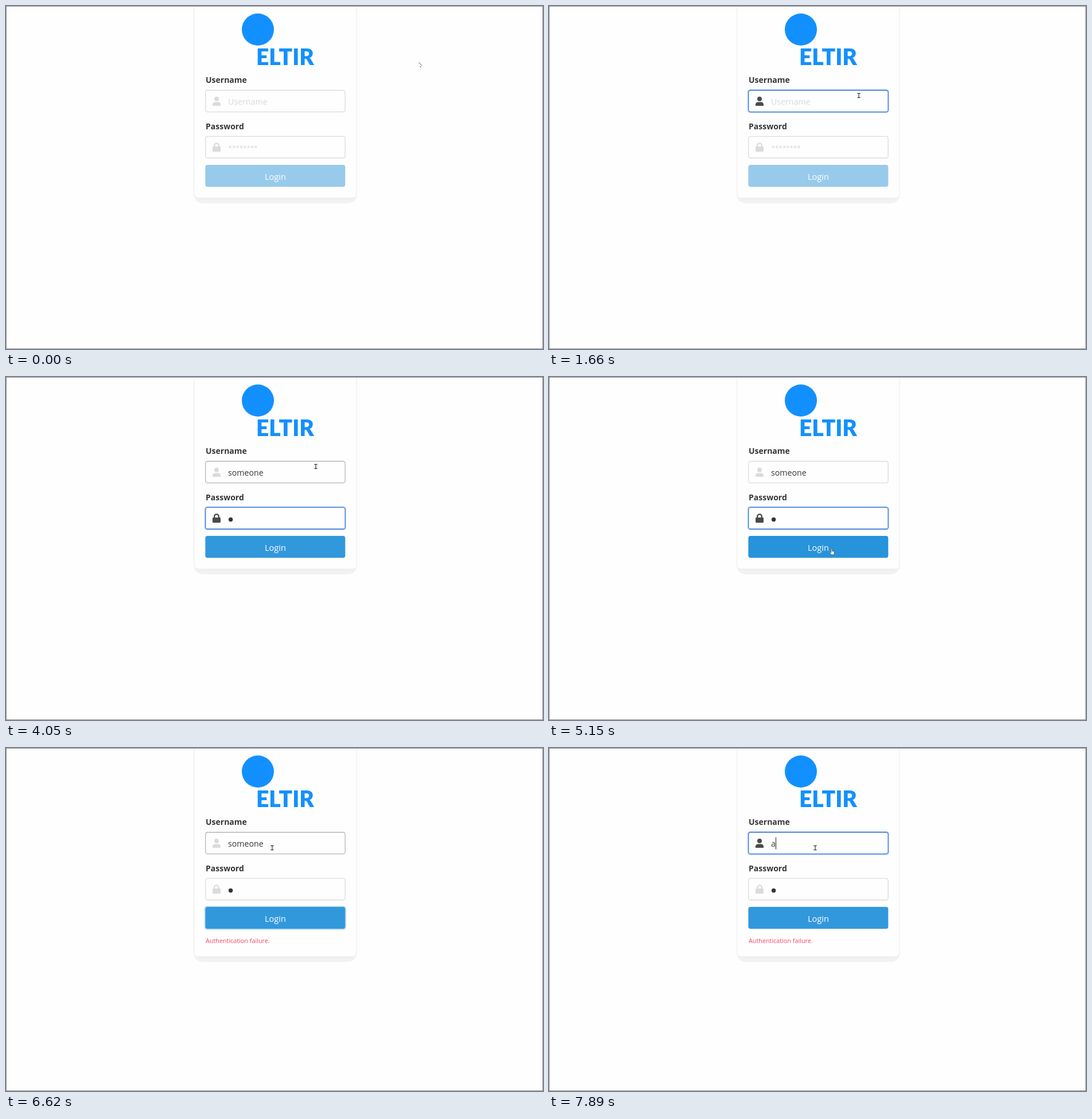
Animation, 936 px wide and 598 px high, one loop 8000 ms. Source, as an HTML page:

```html
<!DOCTYPE html>
<html lang="en">
<head>
<meta charset="utf-8">
<title>Login form</title>
<style>
  html, body { margin: 0; width: 100%; height: 100%; overflow: hidden; background: #fefefe; }
  svg { display: block; width: 936px; height: 598px; }
  text { font: 14.2px "Open Sans", "Noto Sans", sans-serif; fill: #363636; }
  .label { font-size: 14px; font-weight: 700; }
  .hint { fill: #d8d8d8; }
  .stars { font-size: 11.6px; }
  .login { font-size: 14.6px; fill: #fff; text-anchor: middle; }
  .error { font-size: 10.8px; fill: #f14668; }
  .brand { font: 900 39px Lato, "Open Sans", sans-serif; fill: #1390ff; text-anchor: end; }
</style>
</head>
<body>
<svg viewBox="0 0 936 598">
  <rect width="936" height="598" fill="#fefefe"/>
  <g id="card">
    <rect x="327.3" y="-60" width="284.2" height="404" rx="15" fill="#f2f2f2"/>
    <rect x="332" y="-60" width="275" height="398" rx="8" fill="#efefef"/>
    <rect x="327.3" y="-60" width="284.2" height="395.2" rx="7" fill="#f0f0f0"/>
    <rect x="328.5" y="-60" width="281.8" height="394" rx="6" fill="#fefefe"/>
  </g>
  <circle cx="439" cy="41" r="28" fill="#1390ff"/>
  <text class="brand" x="537" y="103">ELTIR</text>

  <text class="label" x="348" y="134">Username</text>
  <g id="userBox">
    <rect class="ring" x="345.4" y="144.7" width="247.8" height="42.2" rx="5.5" fill="#ccdcf6"/>
    <rect class="edge" x="347.7" y="147" width="243.4" height="37.6" rx="3.5" fill="#fefefe" stroke-width="1.3"/>
    <g class="icon">
      <circle cx="367" cy="162" r="4"/>
      <path d="M360 174v-2.2a4.2 4.2 0 0 1 4.2-4.2h5.6a4.2 4.2 0 0 1 4.2 4.2v2.2z"/>
    </g>
  </g>
  <rect id="selection" x="387" y="155" height="22" fill="#0078d7"/>
  <text id="userHint" class="hint" x="387" y="172.3">Username</text>
  <text id="userText" x="387" y="172.3"></text>

  <text class="label" x="348" y="214.5">Password</text>
  <g id="passBox">
    <rect class="ring" x="345.4" y="225.1" width="247.8" height="42.2" rx="5.5" fill="#ccdcf6"/>
    <rect class="edge" x="347.7" y="227.4" width="243.4" height="37.6" rx="3.5" fill="#fefefe" stroke-width="1.3"/>
    <g class="icon">
      <rect x="360" y="245" width="14" height="9" rx="1.4"/>
      <path d="M362 246v-2.8a5 5 0 0 1 10 0v2.8h-2.4v-2.8a2.6 2.6 0 0 0-5.2 0v2.8z"/>
    </g>
  </g>
  <text id="passHint" class="hint stars" x="387.5" y="251.2">********</text>
  <circle id="bullet" cx="391.6" cy="248.5" r="3.7" fill="#363636"/>
  <rect id="caret" width="1" height="21" fill="#222"/>

  <rect id="loginRing" x="345.4" y="274.9" width="247.8" height="42.4" rx="5.5" fill="#cbe5f6"/>
  <rect id="button" x="347.4" y="276.9" width="243.9" height="38.4" rx="4"/>
  <text id="loginText" class="login" x="469.5" y="302.8">Login</text>
  <path id="spinner" d="M463.6 290.6a7 7 0 1 0 11.4 8" fill="none" stroke="#fff" stroke-width="1.9"/>
  <text id="error" class="error" x="348" y="340.3">Authentication failure.</text>

  <g id="pointer" fill="none" stroke-linecap="round">
    <g id="arrow">
      <path d="M-2.5-3.5L3 1.8" stroke="#555"/>
      <path d="M0 3.2L1 4.2" stroke="#777" stroke-width="1.4"/>
      <path d="M-2.5-3.5V3.6" stroke="#eee" stroke-width=".6"/>
    </g>
    <path id="beam" d="M-2.2-3.6H2.2M0-3.6V3.6M-2.2 3.6H2.2" stroke="#333" stroke-width="1.2"/>
    <path id="hand" d="M-1.3 1.2V-5.1q.8-1.3 1.6 0V-1.5l3.2.8q1 .4.8 1.6L3.6 4.8H-.7L-3.5 1.3q.5-1.5 2.2-.1z"
      fill="#fff" stroke="#555" stroke-width=".8" stroke-linejoin="round"/>
  </g>
  <rect x=".5" y=".5" width="935" height="597" fill="none" stroke="#8c8c8c"/>
</svg>
<script>
const LOOP = 8000;
const NAME = "someone";
const $ = id => document.getElementById(id);
const show = (id, on) => $(id).setAttribute("display", on ? "inline" : "none");
const set = (el, name, value) => el.setAttribute(name, value);
const at = (kind, x, y, hover = "") => ({ kind, x, y, hover });
const type = n => ({ text: NAME.slice(0, n), caret: true });

const START = {
  text: "", focus: "", caret: false, selected: false,
  filled: false, busy: false, failed: false, ...at("arrow", 722, 102)
};

// Each step changes part of the state from its time on.
const STEPS = [
  [120, at("arrow", 681, 118)],
  [300, at("arrow", 632, 128)],
  [425, at("arrow", 588, 140)],
  [550, at("beam", 554, 152, "user")],
  [700, at("beam", 540, 156, "user")],
  [1130, { focus: "user", caret: true }],
  [1660, { caret: false }],
  [2090, { caret: true }],
  [2400, type(2)],
  [2680, type(3)],
  [2830, type(4)],
  [2950, type(5)],
  [3230, type(6)],
  [3370, type(7)],
  [3620, { focus: "pass", caret: true }],
  [4050, { filled: true, caret: false }],
  [4610, { caret: true, ...at("beam", 537, 163, "user") }],
  [4760, at("arrow", 522, 213)],
  [4880, at("hand", 500, 293, "login")],
  [5030, at("hand", 496, 300, "login")],
  [5150, { caret: false, ...at("hand", 493, 305, "login") }],
  [5400, { focus: "login", busy: true }],
  [5550, { busy: false, failed: true }],
  [6110, at("arrow", 485, 272)],
  [6230, at("arrow", 462, 220)],
  [6350, at("arrow", 457, 194)],
  [6500, at("beam", 461, 181, "user")],
  [6620, at("beam", 464, 174, "user")],
  [7050, { focus: "user", caret: true }],
  [7300, { caret: false, selected: true }],
  [7890, { text: "a", caret: true, selected: false }]
];

function stateAt(t) {
  const state = { ...START };
  for (const [time, change] of STEPS) if (t >= time) Object.assign(state, change);
  return state;
}

function drawField(name, s) {
  const box = $(name + "Box");
  const focused = s.focus === name;
  const edge = focused ? "#3273dc" : s.hover === name ? "#b5b5b5" : "#dbdbdb";
  set(box.querySelector(".ring"), "display", focused ? "inline" : "none");
  set(box.querySelector(".edge"), "stroke", edge);
  set(box.querySelector(".icon"), "fill", focused ? "#4a4a4a" : "#dbdbdb");
}

function draw(t) {
  const s = stateAt(t);
  drawField("user", s);
  drawField("pass", s);

  $("userText").textContent = s.text;
  $("userText").style.fill = s.selected ? "#fff" : "#363636";
  const width = s.text ? $("userText").getComputedTextLength() : 0;
  show("userHint", !s.text);
  show("selection", s.selected);
  set($("selection"), "width", width);
  show("passHint", !s.filled);
  show("bullet", s.filled);

  const inUser = s.focus === "user";
  show("caret", s.caret);
  set($("caret"), "x", inUser ? Math.ceil(387 + width) : s.filled ? 396 : 388);
  set($("caret"), "y", inUser ? 155.5 : 236);

  show("loginRing", s.focus === "login");
  set($("button"), "fill", !s.filled ? "#98caeb" : s.hover === "login" ? "#2793da" : "#3298dc");
  show("loginText", !s.busy);
  show("spinner", s.busy);
  set($("spinner"), "transform", `rotate(${(t - 5400) * 0.72} 469.5 296)`);

  show("error", s.failed);
  set($("card"), "transform", `translate(0 ${s.failed ? 29 : 0})`);

  for (const kind of ["arrow", "beam", "hand"]) show(kind, s.kind === kind);
  set($("pointer"), "transform", `translate(${s.x} ${s.y})`);
}

const begin = performance.now();
function tick() {
  draw((performance.now() - begin) % LOOP);
  requestAnimationFrame(tick);
}
tick();
</script>
</body>
</html>
```
